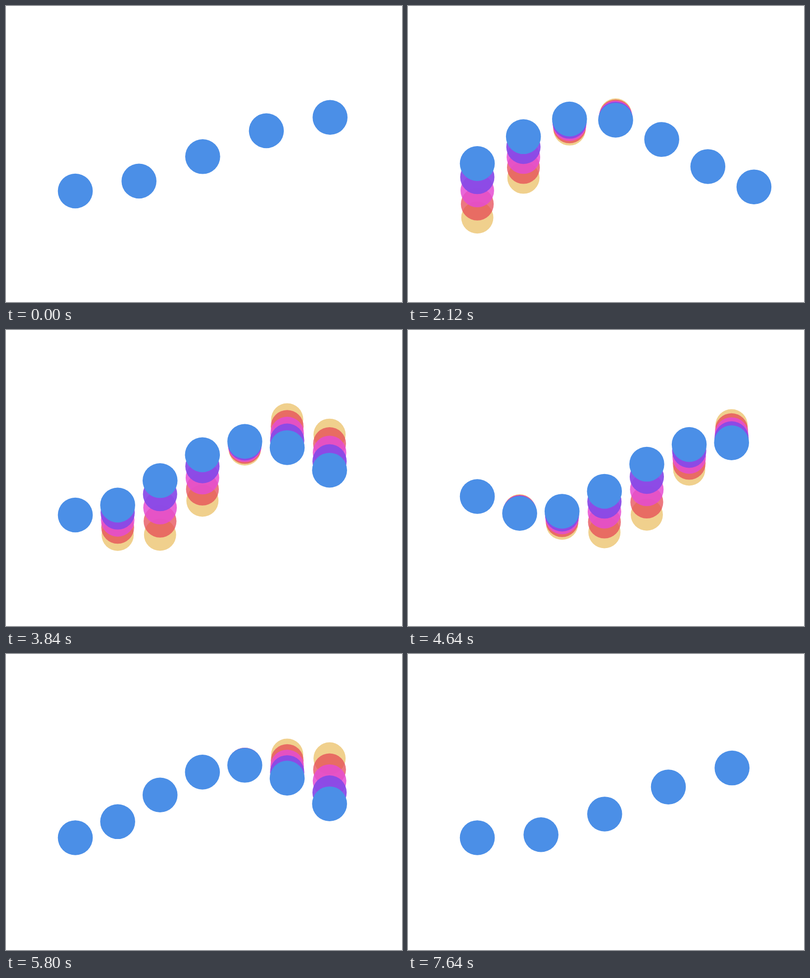
Write an HTML page that moves like this. It is 800 px wide and 600 px high and loops after 7.68 s.

```html
<!DOCTYPE html>
<html lang="en">
<head>
<meta charset="utf-8">
<title>Wave of dots</title>
<style>
  html, body { margin: 0; width: 100%; height: 100%; overflow: hidden; background: #fff; }
  svg { display: block; width: 100vw; height: 100vh; }
</style>
</head>
<body>
<svg id="stage" viewBox="0 0 800 600"></svg>
<script>
const LOOP = 7680, STEP = 40, BOB = 960;
const LEFT = 140, MIDDLE = 300, RADIUS = 35.3;
const HEIGHT = 75, SPREAD = 120;
const FEW = 5, MANY = 7;
const EXPAND = 1576, CONTRACT = 6400, SHIFT = 800;

// Back to front
const layers = [
  { fill: '#f0d08d', opacity: 1 },
  { fill: '#e64b56', opacity: 0.75 },
  { fill: '#e54dd3', opacity: 0.85 },
  { fill: '#874ae8', opacity: 0.93 },
  { fill: '#4b8fe7', opacity: 1 }
];

const stage = document.getElementById('stage');

function addNode(parent, name, attrs = {}) {
  const node = document.createElementNS('http://www.w3.org/2000/svg', name);
  for (const key in attrs) node.setAttribute(key, attrs[key]);
  return parent.appendChild(node);
}

const columns = Array.from({ length: MANY }, () => {
  const group = addNode(stage, 'g');
  const dots = layers.map(({ fill, opacity }, k) => addNode(group, 'circle', {
    fill, 'fill-opacity': opacity, r: RADIUS * (0.92 + 0.02 * k)
  }));
  return { group, dots };
});

const mix = (a, b, p) => a + (b - a) * p;

function smooth(t, start) {
  const s = Math.min(1, Math.max(0, (t - start) / SHIFT));
  return s * s * (3 - 2 * s);
}

function draw(t) {
  const p = smooth(t, EXPAND) - smooth(t, CONTRACT);
  const gap = mix(514.65, 513.65, p) / (mix(FEW, MANY, p) - 1);
  const bob = 2 * Math.PI * t / BOB;
  const swell = 2 * Math.PI * t / LOOP - 0.5;

  columns.forEach(({ group, dots }, i) => {
    group.style.display = i < FEW || p > 0 ? '' : 'none';
    const angle = bob + 0.75 * i;
    const gain = Math.max(0, Math.sin(swell - 0.33 * i));
    const y = MIDDLE + HEIGHT * Math.cos(angle);
    const trail = SPREAD * gain * Math.sin(angle);
    dots.forEach((dot, k) => {
      dot.setAttribute('cx', LEFT + gap * i);
      dot.setAttribute('cy', y + trail * (1 - k / (layers.length - 1)));
    });
  });
}

const begin = performance.now();

function tick() {
  const t = (performance.now() - begin) % LOOP;
  draw(Math.floor(t / STEP) * STEP);
  requestAnimationFrame(tick);
}

tick();
</script>
</body>
</html>
```
